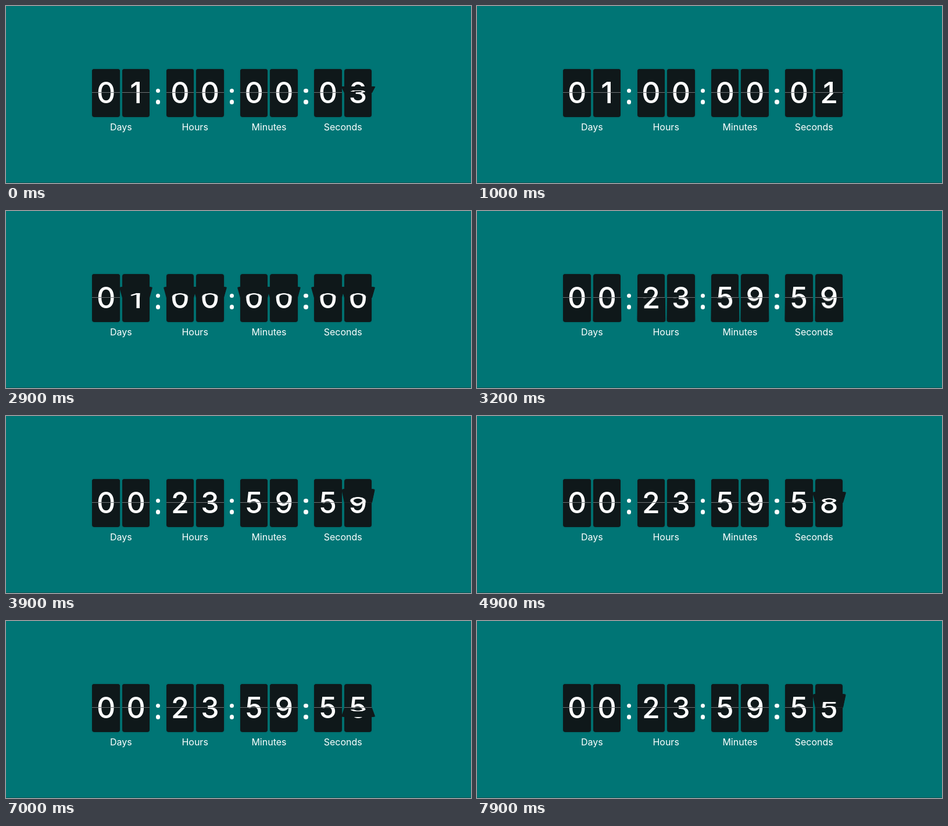
An HTML page for the animation above (8 s loop, 800 by 306 pixels).

```html
<!DOCTYPE html>
<html lang="en">
<head>
<meta charset="utf-8">
<title>Flip countdown</title>
<style>
  html, body { margin: 0; width: 100%; height: 100%; overflow: hidden; background: #007575; }
  #stage {
    position: relative; width: 800px; height: 306px; overflow: hidden;
    color: #fff; font-family: Inter, "Liberation Sans", sans-serif; line-height: 0;
  }
  #stage::after { content: ""; position: absolute; left: 0; right: 0; bottom: 0; height: 1px; background: #0a5555; }
  .group { position: absolute; top: 109px; width: 99.1px; height: 82.6px; }
  .block {
    position: absolute; width: 47.5px; height: 82.6px; perspective: 206.6px;
    font-size: 50px; font-weight: 500; border-radius: 4px; box-shadow: 0 0 2px 1px #0000001a;
  }
  .half {
    position: absolute; left: 0; width: 100%; height: 50%; box-sizing: border-box;
    display: flex; justify-content: center; overflow: hidden; background: #0f181a;
  }
  .upper { top: 0; align-items: flex-end; border-radius: 4px 4px 0 0; border-bottom: 1px solid #ffffff66; }
  .lower { bottom: 0; align-items: flex-start; border-radius: 0 0 4px 4px; }
  .card {
    position: absolute; width: 100%; height: 50%;
    transform-style: preserve-3d; transform-origin: bottom;
  }
  .card .half { height: 100%; backface-visibility: hidden; }
  .card .lower { transform: rotateX(-180deg); }
  .label { position: absolute; top: 99.7px; width: 100%; text-align: center; font-size: 16px; }
  .dot { position: absolute; left: 109.5px; width: 7.4px; height: 7.4px; border-radius: 50%; background: #fff; }
</style>
</head>
<body>
<div id="stage"></div>
<script>
const LOOP = 8000, STEP = 100, FLIP = 700, FIRST = 86403;
// Start of each one-second flip, in ms
const starts = [-321, 648, 1616, 2601, 3617, 4601, 5601, 6609, 7617];
const stage = document.getElementById('stage');

function add(parent, className, text = '') {
  const el = document.createElement('div');
  el.className = className;
  el.textContent = text;
  parent.append(el);
  return el;
}

function makeBlock(group, left) {
  const block = add(group, 'block');
  block.style.left = left + 'px';
  const nextTop = add(block, 'half upper');
  const currentBottom = add(block, 'half lower');
  const card = add(block, 'card');
  const currentTop = add(card, 'half upper');
  const nextBottom = add(card, 'half lower');
  return (current, next, progress) => {
    currentTop.textContent = currentBottom.textContent = current;
    nextTop.textContent = nextBottom.textContent = next;
    const angle = current === next ? 0 : -180 * progress;
    card.style.transform = `rotateX(${angle}deg)`;
  };
}

const blocks = ['Days', 'Hours', 'Minutes', 'Seconds'].flatMap((name, i) => {
  const group = add(stage, 'group');
  group.style.left = 148.3 + 127.3 * i + 'px';
  add(group, 'label', name);
  if (i < 3) for (const y of [34, 53.3]) add(group, 'dot').style.top = y + 'px';
  return [makeBlock(group, 0), makeBlock(group, 51.6)];
});

function digits(seconds) {
  return [seconds / 86400, seconds / 3600 % 24, seconds / 60 % 60, seconds % 60]
    .map(n => String(Math.floor(n)).padStart(2, '0')).join('');
}

// cubic-bezier(.42, 0, .58, 1)
function easeInOut(x) {
  if (x <= 0 || x >= 1) return x <= 0 ? 0 : 1;
  let low = 0, high = 1, u;
  for (let i = 0; i < 24; i++) {
    u = (low + high) / 2;
    const bx = 1.26 * u * (1 - u) ** 2 + 1.74 * u * u * (1 - u) + u ** 3;
    if (bx < x) low = u; else high = u;
  }
  return u * u * (3 - 2 * u);
}

function draw(now) {
  const t = Math.floor(now % LOOP / STEP) * STEP;
  const tick = starts.findLastIndex(start => start <= t);
  const current = digits(FIRST - tick), next = digits(FIRST - tick - 1);
  const progress = easeInOut((t - starts[tick]) / FLIP);
  blocks.forEach((set, i) => set(current[i], next[i], progress));
}

const origin = performance.now();
function frame() {
  draw(performance.now() - origin);
  requestAnimationFrame(frame);
}
frame();
</script>
</body>
</html>
```
